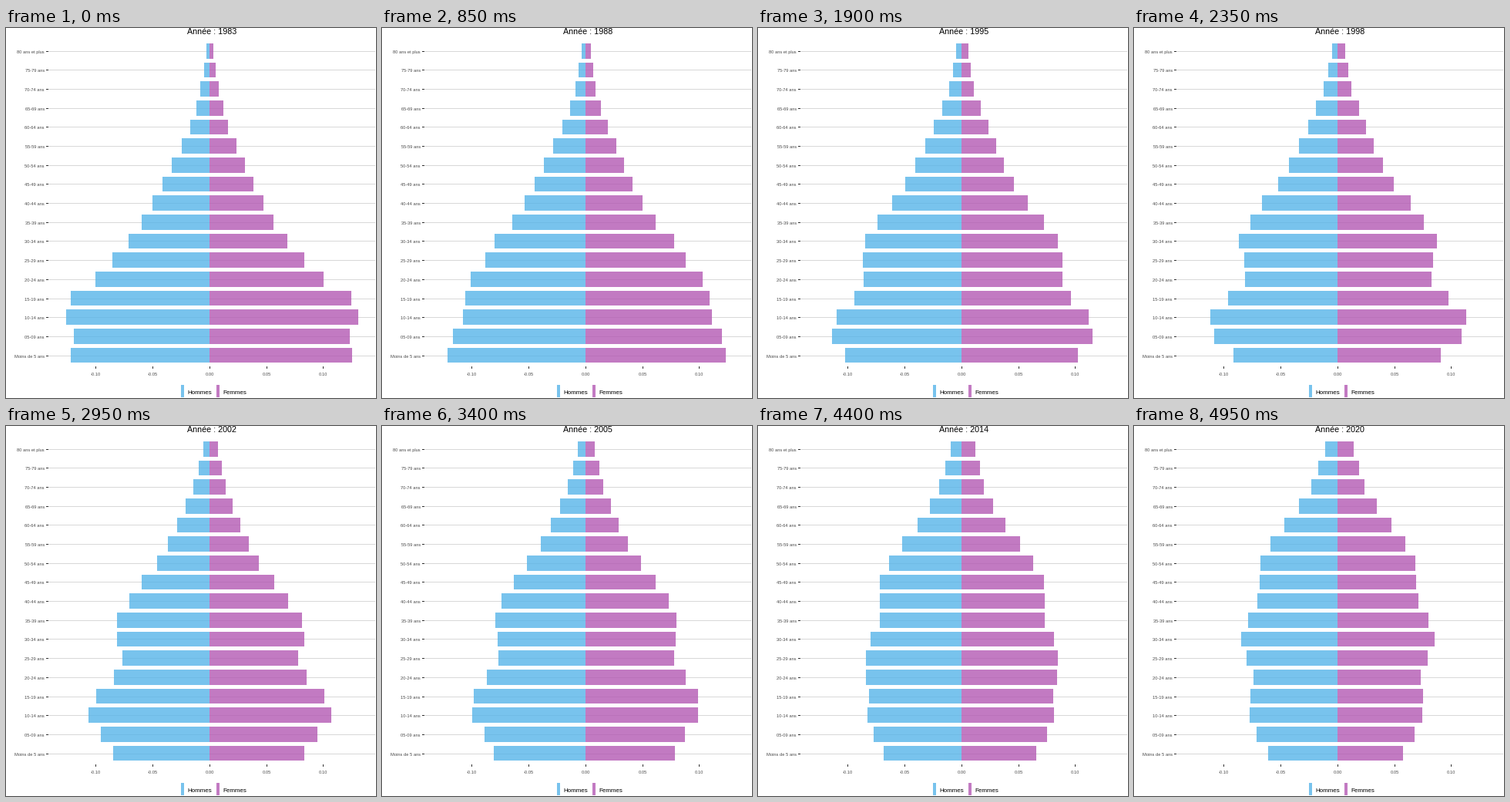
Write a matplotlib script that moves like this. It is 480 px wide and 480 px high and loops after 5000 ms.

```python
import math

import numpy as np
import matplotlib.pyplot as plt
from matplotlib.animation import FuncAnimation
from matplotlib.patches import Rectangle

SIZE = 480
FRAMES, INTERVAL = 100, 50
FIRST_YEAR = 1983
SLOW_FRAMES = 73            # until here each year holds for two frames

ZERO_X, UNIT = 263.9, 1475  # x of the zero line, pixels per unit of share
MIDDLE = round(ZERO_X)
TOP, STEP, BAR = 20.35, 24.68, 19.66
LEFT, RIGHT, BOTTOM = 55, 479, 439
BLUE, PURPLE = "#56B4E9", "#B359B3"
ALPHA = 0.8

AGES = (["Moins de 5 ans", "05-09 ans"]
        + [f"{a}-{a + 4} ans" for a in range(10, 80, 5)]
        + ["80 ans et plus"])
ROWS = np.arange(len(AGES))

# Key points (x, y); values between them are linear.
BIRTHS = [(1900, 32), (1910, 58), (1920, 76), (1931, 114), (1945, 148),
          (1950, 161), (1956, 190), (1965.5, 211), (1976, 170),
          (1986, 179), (1991, 165), (1996.5, 135), (2017.5, 78)]
STAYING = [(0, 1), (1, 0.99), (2, 0.94), (4, 0.716), (5, 0.65),
           (6, 0.622), (10, 0.426), (14, 0.19), (16, 0.11)]
WOMEN_BORN = [(1945, 0.93), (1970, 1.03), (1985, 1.02), (2020, 0.95)]
WOMEN_OLD = [(10, 1), (14, 1.1), (16, 1.4)]


def curve(points, x):
    return np.interp(x, *zip(*points))


def year_at(frame):
    """Year shown in a frame; halves are the steps between two years."""
    if frame < SLOW_FRAMES:
        years, rest = divmod(frame, 3)
        return FIRST_YEAR + years + (0.5 if rest == 2 else 0)
    return FIRST_YEAR + SLOW_FRAMES // 3 + (frame - SLOW_FRAMES) / 2


def bar_lengths(year):
    """Cohorts move up the pyramid; each sex sums to a share of one."""
    born = year - 2.5 - 5 * ROWS
    men = curve(BIRTHS, born) * curve(STAYING, ROWS)
    women = men * curve(WOMEN_BORN, born) * curve(WOMEN_OLD, ROWS)
    return [np.rint(UNIT * sex / sex.sum()) for sex in (men, women)]


fig = plt.figure(figsize=(SIZE / 72, SIZE / 72), dpi=72, facecolor="white")
ax = fig.add_axes([0, 0, 1, 1])
ax.set(xlim=(0, SIZE), ylim=(SIZE, 0))
ax.axis("off")


def box(x, y, w, h, color, alpha=1, z=1):
    patch = Rectangle((x, y), w, h, facecolor=color, alpha=alpha,
                      linewidth=0, zorder=z)
    return ax.add_patch(patch)


def label(x, y, text, size, color="black", ha="left"):
    return ax.text(x, y, text, fontsize=size, color=color, ha=ha,
                   va="baseline", family="Liberation Sans")


men_bars, women_bars = [], []
for row, age in enumerate(AGES):
    top = TOP + STEP * (len(AGES) - 1 - row)
    mid = math.floor(top + BAR / 2)
    y0, y1 = math.floor(top), math.floor(top + BAR)
    box(LEFT, mid, RIGHT - LEFT, 1, "#D8D8D8")
    box(LEFT - 3, mid, 3, 1, "#333333")
    label(50, mid + 3, age, 5.75, "#4D4D4D", "right")
    men_bars.append(box(MIDDLE, y0, 0, y1 - y0, BLUE, ALPHA, 2))
    women_bars.append(box(MIDDLE, y0, 0, y1 - y0, PURPLE, ALPHA, 2))

for share in (-0.10, -0.05, 0, 0.05, 0.10):
    x = round(ZERO_X + share * UNIT)
    box(x, BOTTOM, 1, 3, "#333333")
    label(x, 451, f"{share:.2f}", 5.75, "#4D4D4D", "center")

for x, name, color in ((227, "Hommes", BLUE), (273, "Femmes", PURPLE)):
    box(x, 463, 4, 16, color, ALPHA)
    label(x + 8.5, 475, name, 8)

title = label((LEFT + RIGHT) / 2, 8.4, "", 10.8, ha="center")


def draw(frame):
    year = year_at(frame)
    title.set_text(f"Année : {int(year)}")
    men, women = bar_lengths(year)
    for bar, length in zip(men_bars, men):
        bar.set_x(MIDDLE - length)
        bar.set_width(length)
    for bar, length in zip(women_bars, women):
        bar.set_width(length)
    return [title, *men_bars, *women_bars]


anim = FuncAnimation(fig, draw, frames=FRAMES, interval=INTERVAL,
                     init_func=lambda: draw(0), repeat=True, repeat_delay=0)
plt.show()
```
